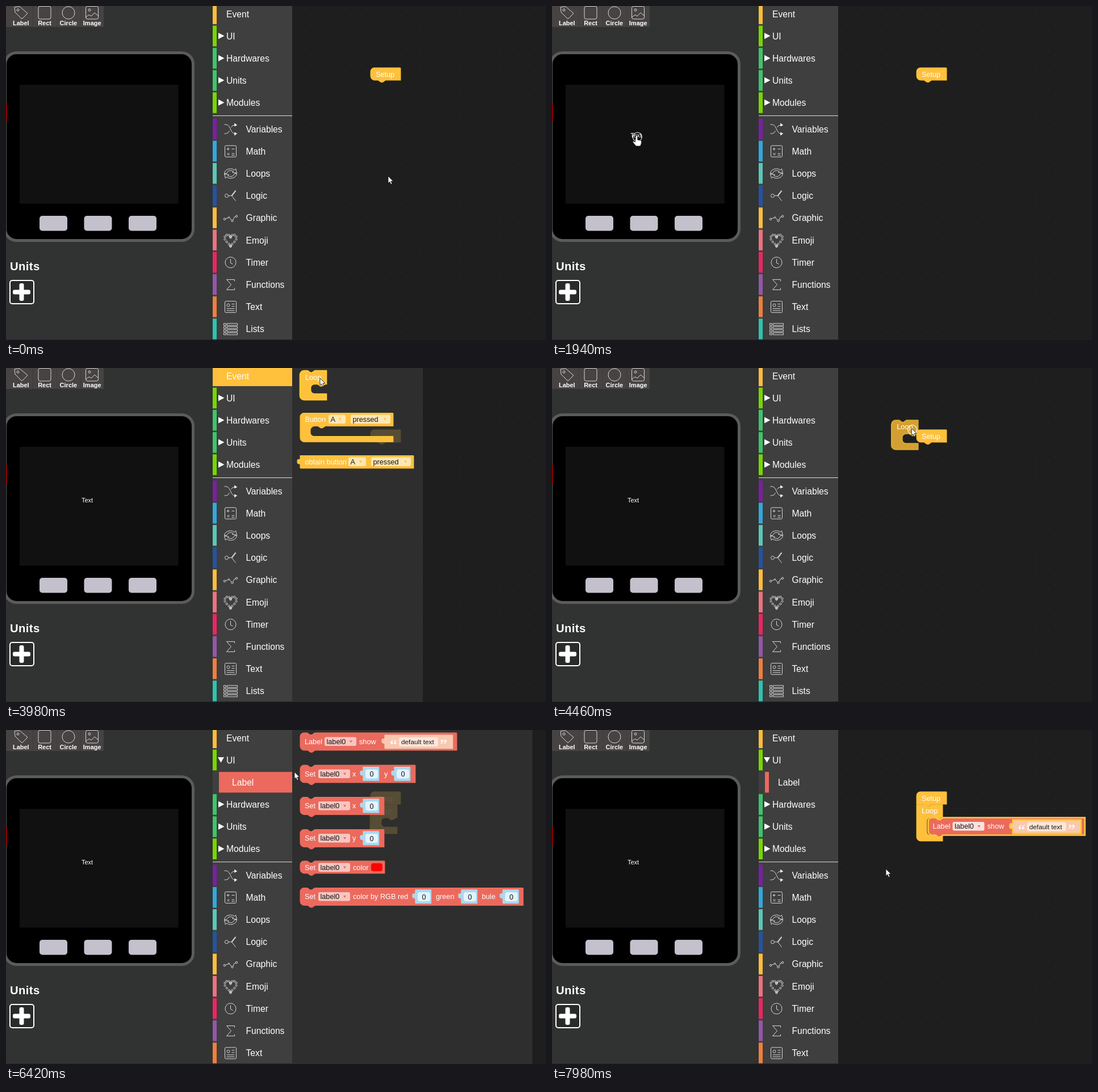
These frames come from a looping animation (951 px wide and 589 px high, 8 s). An HTML page:

```html
<!DOCTYPE html>
<html lang="en">
<head>
<meta charset="utf-8">
<title>Block editor</title>
<style>
  html, body { margin: 0; width: 100%; height: 100%; overflow: hidden; background: #1e1e1e; }
  svg { display: block; width: 951px; height: 589px; font-family: "Liberation Sans", Arial, sans-serif; }
  text { fill: #fff; white-space: pre; }
  .tool { font-size: 11px; font-weight: bold; text-anchor: middle; }
  .menu { font-size: 15.68px; }
  .blk text { font-size: 12.7px; }
  .blk .dark { fill: #151515; }
  .blk .small { font-size: 11.8px; }
  .blk .quote { font: bold 26px "Liberation Serif", serif; fill-opacity: .85; }
  .light { filter: brightness(1.2); }
  .shade { filter: brightness(.8); }
  .sel .face { stroke: #fc3; stroke-width: 2.6; }
  .sel .field { fill-opacity: .8; }
  .drag .face { filter: brightness(.83); }
  .icon { fill: none; stroke: #d8d8d8; stroke-width: 1; }
</style>
</head>
<body>
<svg id="stage" viewBox="0 0 951 589"></svg>
<script>
const PERIOD = 8000, STEP = 120, PITCH = 39.2;
const YELLOW = '#ffc03c', RED = '#eb6a5d', HOVER = '#e4e4e4';

// ---- markup helpers
const rect = (x, y, w, h, fill, r = 0, extra = '') =>
  `<rect x="${x}" y="${y}" width="${w}" height="${h}" rx="${r}" fill="${fill}" ${extra}/>`;
const text = (x, y, s, cls = '') => `<text x="${x}" y="${y}" class="${cls}">${s}</text>`;
const path = (d, fill, cls = '') => `<path d="${d}" fill="${fill}" class="${cls}"/>`;
const circ = (x, y, r) => `<circle cx="${x}" cy="${y}" r="${r}"/>`;
const at = (x, y, body, cls = '', id = '') =>
  `<g ${id && `id="${id}"`} class="${cls}" transform="translate(${x} ${y})">${body}</g>`;

// ---- block shapes, embossed by a lighter and a darker copy below the face
const solid = (d, fill) => at(.6, .6, path(d, fill, 'shade')) + at(-.4, -.4, path(d, fill, 'light')) +
  path(d, fill, 'face');
function shape(w, h, { top = true, tail = true, mouth = 0, under = false, over = false } = {}) {
  const back = 'l-5 3.5h-3l-5-3.5';
  return (under ? 'M0 0' : 'M0 7a7 7 0 0 1 7-7') + (top ? 'H13l5 3.5h3l5-3.5' : '') + `H${w}` +
    (mouth ? `V23H44${back}h-6a7 7 0 0 0-7 7v${mouth - 14}a7 7 0 0 0 7 7H${w}` : '') +
    `V${h}` + (tail ? `H26${back}` : '') + (over ? 'H0z' : 'H7a7 7 0 0 1-7-7z');
}
const plug = (x, y, w, h, fill) => at(x, y,
  solid(`M0 0H${w}V${h}H0V16q-.5-2-2.5-1.5-2.5.5-2.5-2V9q0-2.5 2.5-2 2 .5 2.5-1.5z`, fill));
const field = (x, y, w, s, color) =>
  rect(x, y, w, 15.5, '#fff', 3, 'class="field" fill-opacity=".62"') + text(x + 3.5, y + 12.3, s, 'dark') +
  path(`M${x + w - 12} ${y + 6}h5l-2.5 4z`, color);
const num = x => plug(x, 3.5, 28, 24, '#a9d9f0') + rect(x + 4, 7.5, 22, 16, '#e4f3fb', 4) +
  text(x + 11.5, 20, '0', 'dark');
const loopBody = (mouth, under) =>
  solid(shape(46, 33 + mouth, { tail: false, mouth, under }), YELLOW) + text(9, 15.5, 'Loop');
const setupBody = over => solid(shape(53, 22, { top: false, over }), YELLOW) + text(9, 15.5, 'Setup');
const labelBody = solid(shape(276, 31), RED) + text(8, 19.5, 'Label') + field(43, 7.5, 56, 'label0', RED) +
  text(104, 19.5, 'show') + plug(149, 4, 120, 24, '#f9c8b0') + text(158, 29, '“', 'quote') +
  rect(174, 8, 69, 16, '#fde6da', 4) + text(178, 20, 'default text', 'dark small') +
  text(246, 29, '”', 'quote');
const setRow = (y, w, parts, h = 31) => at(518, y,
  solid(shape(w, h), RED) + at(0, h < 31 ? -4 : 0,
    text(8, 19.5, 'Set') + field(32, 7.5, 56, 'label0', RED) + parts), 'blk');

// ---- menu
const heart = Array.from({ length: 18 }, (_, i) => {
  const a = i / 18 * 2 * Math.PI;
  const y = 13 * Math.cos(a) - 5 * Math.cos(2 * a) - 2 * Math.cos(3 * a) - Math.cos(4 * a);
  return circ((10.5 * Math.sin(a) ** 3).toFixed(1), (-.72 * y - 1).toFixed(1), 1.6);
}).join('');
const line = d => `<path d="${d}"/>`;
const box = line('M-8-10H8q2 0 2 2V8q0 2-2 2H-8q-2 0-2-2V-8q0-2 2-2z');
const icons = [
  line('M-11-8h3C0-8 0 8 7 8h4M-11 8h3q4 0 6-5M1-3q2-4 6-4h4') +
    '<path fill="#fff" d="M7-10l4 3-4 2zM7 6l4 2-4 3z"/>',
  box + line('M-7-4h5M-4.5-6.5v5M2-4h5M-6 3l4 4m0-4l-4 4M2 4h5M2 7h5'),
  line('M-11 0Q-10-8 0-8.5q4 0 7 2.5l2-2.5 2 7.5-8-1 2-2Q-4-8-7 0zM11 0Q10 8 0 8.5q-4 0-7-2.5l-2 2.5-2-7.5 8 1-2 2Q4 8 7 0z'),
  circ(-7, 0, 3) + line('M-4 0H2L9 9') + '<path stroke-width="2" d="M2 0L9-9"/>',
  circ(-10.5, 2, 1.7) + circ(-3, -1, 1.2) + circ(3, 5, 1.7) + circ(10.5, -3, 1.7) +
    line('M-9 1.5l5-2M-2-.5L2 4M4 4l3-6h2'),
  heart,
  circ(0, 0, 9.5) + line('M0-6V1l4 2'),
  line('M7-6V-9H-7L1 0-7 9H7V6'),
  box + circ(-4, -3, 2.5) + line('M2-5h5M2-1h5M-7 3H7M-7 6.5H7'),
  [-10, -4.5, 1, 6.5].map(y => line(`M-12 ${y}h4v3.5h-4zM-6 ${y}H12v3.5H-6z`)).join('')
];
const bar = (x, cy, color) => rect(x, cy - 18.5, 7, 36.5, color);
const shade = (id, cy, x = 371) => rect(x, cy - 18.5, 504 - x, 36.5, HOVER, 0, `id="${id}"`);
const caret = cy => `<path fill="#fff" d="M374 ${cy - 6}l10.5 5.5-10.5 5.5z"/>`;
const rowY = i => 14 + PITCH * i;
const group = (i, name, color) => bar(364, rowY(i), color) + caret(rowY(i)) + text(388, rowY(i) + 5.5, name, 'menu');
const lower = [['Hardwares', '#3fc46a'], ['Units', '#3fc46a'], ['Modules', '#77d700']]
  .map(([n, c], i) => group(i + 2, n, c)).join('') + rect(364, 193, 140, 1, '#ddd') +
  [['Variables', '#7b1fa2'], ['Math', '#34a7df'], ['Loops', '#5ac8b8'], ['Logic', '#2553a1'],
   ['Graphic', '#ffbe3d'], ['Emoji', '#eb7280'], ['Timer', '#ee2463'], ['Functions', '#9357a8'],
   ['Text', '#f07f3e'], ['Lists', '#2ec4b0']].map(([n, c], i) => {
    const y = 217 + PITCH * i;
    return bar(364, y, c) + at(395.5, y, icons[i], 'icon') + text(422.5, y + 5.5, n, 'menu');
  }).join('');
const menu = rect(364, 0, 140, 589, '#3f3f3f') + bar(364, 14, '#ffbd3b') + shade('eventRow', 14) +
  text(388, 19.5, 'Event', 'menu') + bar(364, rowY(1), '#77d700') + shade('uiRow', rowY(1)) +
  `<path id="caret" fill="#fff"/>` + text(388, rowY(1) + 5.5, 'UI', 'menu') +
  `<g id="sub">${bar(375, rowY(2), RED)}${shade('labelRow', rowY(2), 382)}${text(398, rowY(2) + 5.5, 'Label', 'menu')}</g>` +
  `<g id="lower">${lower}</g>`;

// ---- left panel
const tools = ['Label', 'Rect', 'Circle', 'Image'].map((n, i) => text(26.3 + 41.8 * i, 34, n, 'tool')).join('');
const panel = rect(0, 0, 364, 589, '#303332') + rect(0, 0, 172, 37, '#464342') +
  [47, 89, 131].map(x => rect(x, 0, 1, 37, '#3f3c3b')).join('') + tools +
  `<g class="icon"><path d="M15 2l9-1 13 11q1 1 0 2l-8 8q-1 1-2 0L16 11z"/>${circ(21, 7, 2)}
  <rect x="57" y="0.5" width="22" height="22.5" rx="3"/>${circ(110, 12, 11)}
  <rect x="140.5" y="0.5" width="22" height="22.5" rx="3"/>${circ(147, 7, 2)}<path d="M141 20q5-7 9-2l6-6 6 5"/></g>` +
  rect(-1.5, 82.5, 331, 331, '#000', 20, 'stroke="#5b5b5b" stroke-width="5"') +
  rect(0, 171, 1, 33, '#f00') + rect(24, 139, 279.5, 209.5, '#111') +
  [59, 137.5, 216].map(x => rect(x, 370, 49, 26.5, '#c4c0cc', 5)).join('') +
  '<text x="7" y="466" font-size="20.3" letter-spacing=".4" font-weight="bold">Units</text>' +
  rect(7, 484, 42, 41, '#292b2b', 4, 'stroke="#fff" stroke-width="2"') +
  rect(12, 500.5, 31, 8, '#fff', 3) + rect(23.5, 489, 8, 31, '#fff', 3);

// ---- flyouts
const sheet = w => rect(504, 0, w, 589, '#323232', 0, 'fill-opacity=".82"');
const eventFly = sheet(230) + at(518, 5, loopBody(18), 'blk sel') +
  at(518, 79.5, solid(shape(164, 51, { top: false, tail: false, mouth: 18 }), YELLOW) + text(8.5, 15.5, 'Button') +
    field(50, 3, 30, 'A', YELLOW) + field(89, 3, 70, 'pressed', YELLOW), 'blk') +
  at(518, 154.5, plug(0, 0, 200, 22.5, YELLOW) + text(8.5, 15.5, 'obtain button') +
    field(85, 3, 31, 'A', YELLOW) + field(125, 3, 70, 'pressed', YELLOW), 'blk');
const labelFly = sheet(423) + at(518, 5, labelBody, 'blk') +
  setRow(62, 203, text(92, 19.5, 'x') + num(111) + text(148, 19.5, 'y') + num(166)) +
  setRow(118.5, 148, text(92, 19.5, 'x') + num(111)) +
  setRow(175.5, 148, text(92, 19.5, 'y') + num(111)) +
  setRow(231, 149, text(93, 19.5, 'color') + rect(125, 8, 20, 14, '#f00', 4), 22) +
  setRow(278.5, 393, text(93, 19.5, 'color by RGB red') + num(203) + text(239, 19.5, 'green') +
    num(284) + text(320, 19.5, 'bule') + num(357));

let dots = '';
for (let i = 0; i < 25; i++)
  for (let j = 0; j < 34; j++)
    dots += `M${Math.round(520 + 17.45 * i)} ${Math.round(16 + 17.45 * j)}h1v1h-1z`;

document.getElementById('stage').innerHTML =
  rect(504, 0, 447, 589, '#1e1e1e') + path(dots, '#3c3c3c') +
  at(642, 131, '', 'blk', 'loop') + at(642, 109, '', 'blk', 'setup') +
  at(0, 0, labelBody, 'blk sel', 'label') +
  `<g id="eventFly">${eventFly}</g><g id="labelFly">${labelFly}</g>` +
  panel + menu + rect(0, 588, 504, 1, '#262626') +
  '<text id="word" font-size="11">Text</text>' +
  at(0, 0, '<circle id="ring" cx="1.3" cy="2" r="8" fill="none" stroke="#fff" stroke-width="1.1"/>' +
    '<path id="arrow" fill="#fff" stroke="#111" stroke-width=".8" d="M0 0V12.5l2.8-2.7 2 4.7 2.2-.9-2-4.6h3.9z"/>' +
    '<path id="hand" fill="#fff" stroke="#111" stroke-width=".7" d="M-1.5 1a1.6 1.6 0 0 1 3.2 0V7l5 1q2 .5 2 2.5l-.8 4-1.4 3.5h-7.5l-5-6q-1.5-2 .5-2.5l3 1.5z"/>',
    '', 'cursor');

// ---- motion: [ms, x, y]
const cursorPath = [
  [250, 673, 300], [490, 520, 230], [850, 60, 24], [970, 24, 14], [1220, 24, 14], [1820, 138, 205],
  [1940, 149, 229], [2060, 149, 233], [2180, 152, 240], [2420, 230, 275], [2660, 400, 240],
  [2900, 500, 68], [3140, 440, 20], [3380, 432, 15], [3740, 550, 17], [3860, 553, 18], [4100, 553, 18],
  [4580, 660, 136], [4830, 676, 145], [4950, 668, 146], [5190, 593, 122], [5460, 470, 58],
  [5580, 441, 43], [5820, 436, 52], [6060, 430, 66], [6180, 428, 88], [6300, 450, 90], [6420, 508, 74],
  [6780, 542, 22], [6900, 542, 19], [7020, 603, 83], [7260, 640, 130], [7740, 670, 165],
  [7860, 640, 205], [7980, 588, 245]
];
const labelPath = [[7020, 523, 18.5], [7140, 565, 62], [7740, 648, 151], [7860, 662.5, 154.5]];
const active = [[370, 970], [1340, 4580], [4830, 5190], [5340, 7980]];

function held(t) {
  let now = 0;
  for (const [a, b] of active)
    if (t >= a) now = Math.min(b, a + Math.floor((t - a) / STEP) * STEP);
  return now;
}
function along(keys, t) {
  const i = keys.findIndex(k => k[0] > t);
  if (i < 0) return keys[keys.length - 1].slice(1);
  if (!i) return keys[0].slice(1);
  const [a, b] = [keys[i - 1], keys[i]], f = (t - a[0]) / (b[0] - a[0]);
  return [1, 2].map(n => a[n] + (b[n] - a[n]) * f);
}

const $ = id => document.getElementById(id);
const show = (id, on) => $(id).setAttribute('visibility', on ? 'visible' : 'hidden');
const move = (id, x, y) => $(id).setAttribute('transform', `translate(${x} ${y})`);
const between = (t, a, b) => t >= a && t < b;

function draw(t) {
  const [x, y] = along(cursorPath, t);
  const over = i => x > 364 && x < 504 && Math.abs(y - rowY(i)) < 19;
  const eventOpen = between(t, 3380, 4220), labelOpen = between(t, 6300, 7020), open = t >= 5700;

  move('cursor', x, y);
  const hand = between(t, 970, 2180);
  show('hand', hand);
  show('arrow', !hand);
  show('ring', between(t, 1340, 2180) || t === 3380 || between(t, 4220, 4830) || t === 5700 || between(t, 7020, 7860));

  show('word', t >= 1340);
  const [wx, wy] = t < 2180 ? [x - 11, y + 3] : [133, 237];
  move('word', wx, wy);

  show('eventRow', eventOpen || over(0));
  $('eventRow').setAttribute('fill', eventOpen ? YELLOW : HOVER);
  show('uiRow', over(1) && !labelOpen);
  show('sub', open);
  show('labelRow', open && (labelOpen || over(2)));
  $('labelRow').setAttribute('fill', labelOpen ? RED : HOVER);
  move('lower', 0, open ? PITCH : 0);
  $('caret').setAttribute('d', open ? 'M373 48h11l-5.5 9.5z' : 'M374 47.2l10.5 5.5-10.5 5.5z');
  show('eventFly', eventOpen);
  show('labelFly', labelOpen);

  const dragLoop = between(t, 4220, 4830), joined = t >= 4830;
  $('setup').innerHTML = setupBody(joined);
  $('loop').innerHTML = loopBody(t >= 7860 ? 32 : 18, joined);
  show('loop', t >= 4220);
  move('loop', ...(dragLoop ? [x - 35, y - 14] : [642, 131]));
  $('loop').setAttribute('class', 'blk' + (t < 7020 ? ' sel' : '') + (dragLoop ? ' drag' : ''));

  show('label', t >= 7020);
  move('label', ...along(labelPath, t));
  $('label').setAttribute('class', 'blk sel' + (t < 7860 ? ' drag' : ''));
}

const start = performance.now();
let shown = -1;
(function frame() {
  const t = held((performance.now() - start) % PERIOD);
  if (t !== shown) draw(shown = t);
  requestAnimationFrame(frame);
})();
</script>
</body>
</html>
```
